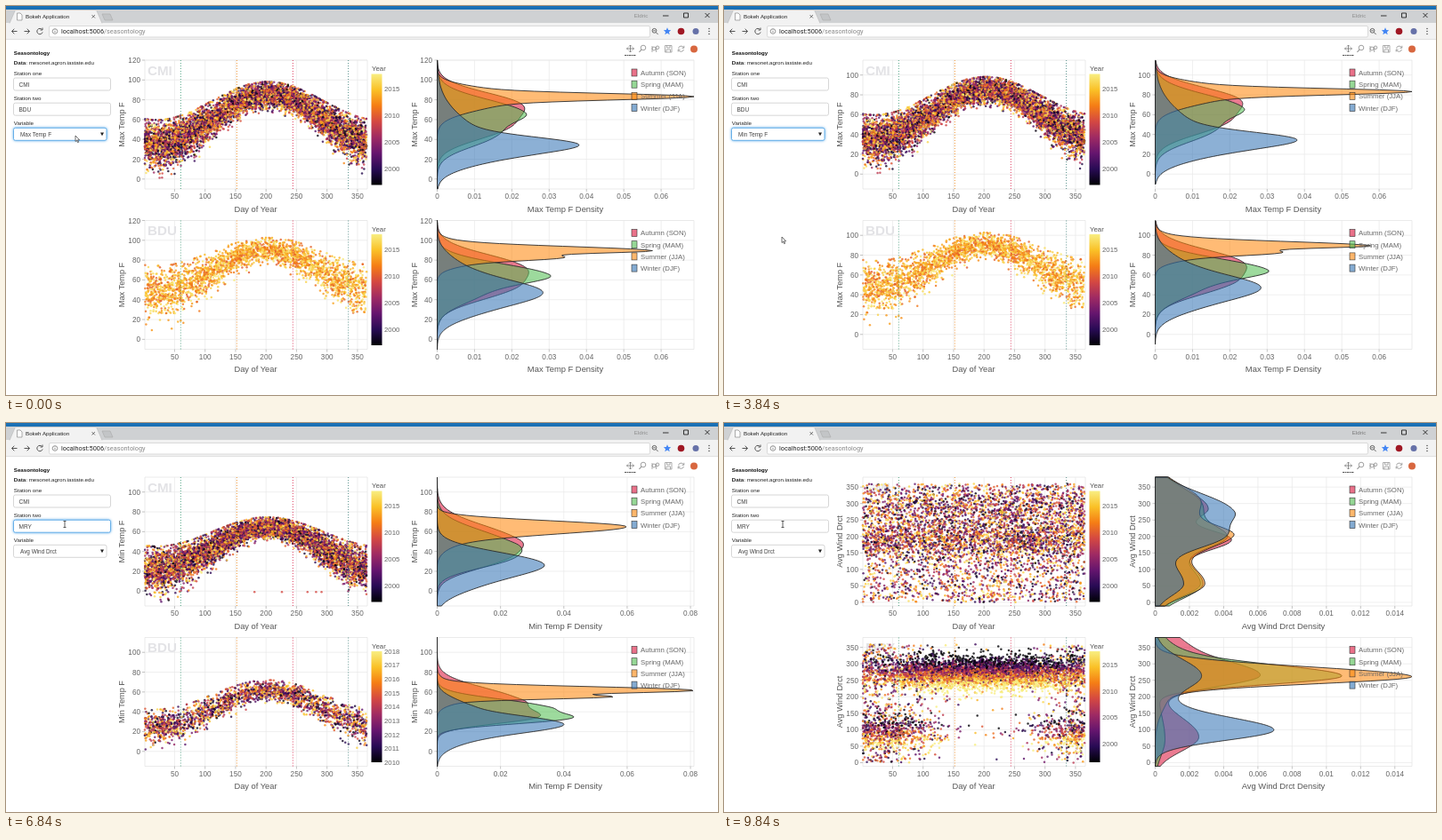
These frames come from a looping animation (800x438 px, 9.88 s). An HTML page with a canvas:

```html
<!DOCTYPE html>
<html lang="en">
<head>
<meta charset="utf-8">
<title>Seasontology</title>
<style>
html, body { margin: 0; width: 800px; height: 438px; overflow: hidden; background: #fff; }
svg, canvas { position: absolute; left: 0; top: 0; }
text { font-family: "Liberation Sans", Arial, sans-serif; white-space: pre; }
</style>
</head>
<body>
<svg id="back" width="800" height="438"></svg>
<canvas id="dots" width="800" height="438"></canvas>
<svg id="front" width="800" height="438">
  <defs>
    <linearGradient id="ramp" x1="0" y1="1" x2="0" y2="0"></linearGradient>
    <clipPath id="edge"><rect x="440" y="50" width="337" height="380"/></clipPath>
  </defs>
  <g id="chrome"></g>
  <g id="plots"></g>
  <g id="form"></g>
  <g id="pointer"></g>
</svg>
<script>
const LOOP = 9880, H = 145, TOPS = [61, 241.5], SX = 156, SW = 250, DX = 484.5, DW = 288.5;
const $ = id => document.getElementById(id);
const clamp = (v, a, b) => Math.min(b, Math.max(a, v));

const text = (x, y, s, size, fill = '#666', more = '') =>
  `<text x="${x}" y="${y}" font-size="${size}" fill="${fill}" ${more}>${s}</text>`;
const rect = (x, y, w, h, fill, more = '') =>
  `<rect x="${x}" y="${y}" width="${w}" height="${h}" fill="${fill}" ${more}/>`;
const path = (d, stroke, width = 1, more = 'fill="none"') =>
  `<path d="${d}" stroke="${stroke}" stroke-width="${width}" ${more}/>`;
const circle = (x, y, r, fill, more = '') => `<circle cx="${x}" cy="${y}" r="${r}" fill="${fill}" ${more}/>`;
const MID = 'text-anchor="middle"', END = 'text-anchor="end"';

// Colour scale of the years, dark to light
const RAMP = [[0, 0, 4], [40, 11, 84], [101, 21, 110], [159, 42, 99], [212, 72, 66], [245, 125, 21], [250, 193, 39], [248, 238, 130]];
function rampColor(t) {
  const p = clamp(t, 0, 0.999) * (RAMP.length - 1), i = Math.floor(p);
  return `rgb(${RAMP[i].map((c, k) => Math.round(c + (RAMP[i + 1][k] - c) * (p - i)))})`;
}
$('ramp').innerHTML = RAMP.map((c, i) => `<stop offset="${i / (RAMP.length - 1)}" stop-color="rgb(${c})"/>`).join('');

const SEASONS = [
  ['Autumn (SON)', 'rgb(220,20,60)'], ['Spring (MAM)', 'rgb(80,190,80)'],
  ['Summer (JJA)', 'rgb(255,135,10)'], ['Winter (DJF)', 'rgb(50,115,180)']
];

// Density bumps per season: centre, height, spread above, spread below
const MAX_A = [
  [[50, 88, 14, 14], [77, 66, 13, 14]],
  [[59, 92, 15, 11], [84, 62, 12, 14]],
  [[41, 195, 3.2, 3.5], [41, 94, 9, 13]],
  [[95, 97, 8, 9], [106, 66, 32, 13]]
];
const MAX_B = [
  [[53, 92, 15, 14], [78, 66, 12, 14]],
  [[61, 112, 13, 9], [80, 50, 12, 14]],
  [[34, 160, 4.5, 2.5], [38, 90, 9, 9], [42, 60, 2.5, 3]],
  [[79.5, 102, 13, 13], [100, 38, 14, 13], [55, 25, 15, 12]]
];
const MIN_A = [
  [[70, 80, 17, 12], [92, 64, 12, 13]],
  [[74, 72, 16, 11], [93, 66, 11, 11]],
  [[55.5, 208, 6.5, 8], [70, 22, 8, 10]],
  [[97, 110, 13, 12], [118, 42, 12, 13]]
];
const MIN_B = [
  [[70, 84, 14, 8], [89, 110, 9, 8]],
  [[78, 112, 9, 6], [91, 140, 6, 6.5]],
  [[59.5, 245, 4, 3.2], [67, 135, 1.8, 2.5], [64, 50, 9, 8]],
  [[96, 118, 10, 9], [108, 45, 10, 12], [75, 22, 9, 6]]
];
const WIND_A = [
  [[35, 172, 20, 13], [70, 228, 11, 12], [120, 148, 24, 14]],
  [[32, 152, 20, 20], [68, 190, 13, 13], [120, 156, 24, 16]],
  [[28, 150, 18, 24], [66, 206, 11, 15], [120, 162, 22, 14]],
  [[38, 245, 20, 15], [68, 190, 13, 13], [120, 93, 21, 13]]
];
const WIND_B = [
  [[18, 80, 17, 16], [46, 222, 14, 14], [127, 140, 40, 11]],
  [[15, 105, 14, 18], [47, 180, 13, 16], [130, 162, 34, 9]],
  [[18, 85, 18, 18], [48, 185, 15, 13], [85, 105, 17, 20], [124, 140, 16, 13]],
  [[44, 282, 15, 16], [12, 70, 14, 14], [127, 137, 30, 10]]
];
const WIND_C = [
  [[43, 115, 16, 12], [8, 28, 16, 16], [112, 49, 22, 16]],
  [[44, 195, 12, 9], [25, 30, 18, 15], [115, 11, 30, 18]],
  [[44, 284, 11, 8], [60, 16, 10, 20]],
  [[43, 52, 18, 16], [105, 128, 13, 11], [85, 20, 13, 12]]
];

function randoms(seed) {
  const next = () => {
    seed = (seed + 0x6D2B79F5) | 0;
    let t = Math.imul(seed ^ (seed >>> 15), 1 | seed);
    t = (t + Math.imul(t ^ (t >>> 7), 61 | t)) ^ t;
    return ((t ^ (t >>> 14)) >>> 0) / 4294967296;
  };
  next.normal = () => Math.sqrt(-2 * Math.log(next() + 1e-9)) * Math.cos(2 * Math.PI * next());
  return next;
}

// Each cloud is a list of [day, value, colour]
function cloud(seed, count, sample) {
  const rnd = randoms(seed), points = [];
  for (let i = 0; i < count; i++) {
    const day = 1 + 364 * rnd();
    const [value, t] = sample(rnd, Math.cos(2 * Math.PI * (day - 203) / 365));
    points.push([day, value, rampColor(t)]);
  }
  return points;
}
const temps = (mean, swing, cold, warm, first = 0) => (rnd, c) =>
  [mean + swing * c + clamp(rnd.normal(), -3, 2.1) * (cold + (warm - cold) * (c + 1) / 2), first + (1 - first) * rnd()];
const winds = (...groups) => rnd => {
  let pick = rnd(), v = 360 * rnd();
  for (const [share, centre, spread] of groups) {
    if (pick >= 0 && pick < share) v = centre + spread * rnd.normal();
    pick -= share;
  }
  return [(v + 360) % 360, rnd()];
};
const coastWind = (rnd, c) => {
  const off = rnd() < 0.02 + 0.75 * ((1 - c) / 2) ** 2, east = off && rnd() < 0.45;
  const centre = east ? 92 : 272;
  const v = off && !east ? 360 * rnd() : centre + 25 * rnd.normal();
  return [clamp(v, 0, 360), off && !east ? rnd() : 0.52 - (v - centre) / 75 + 0.22 * rnd.normal()];
};

const TEMP_HIGH = [-10, 120], TEMP_LOW = [-15, 115], COMPASS = [-11, 380];
const dataset = (curves, range, xmax, points, first, last) => ({ curves, range, xmax, points, first, last });
const maxA = dataset(MAX_A, TEMP_HIGH, .0688, cloud(1, 7000, temps(60.5, 25, 11.5, 6)), 1997, 2017.8);
const maxB = dataset(MAX_B, TEMP_HIGH, .0688, cloud(2, 2500, temps(68.5, 21.5, 13, 6, .62)), 1997, 2017.8);
const minA = dataset(MIN_A, TEMP_LOW, .0811, cloud(3, 6500, temps(43, 21, 11, 5)), 1997, 2017.8);
const minB = dataset(MIN_B, TEMP_LOW, .0811, cloud(4, 2200, temps(43, 18.5, 8.5, 5)), 2010, 2018);
const windA = dataset(WIND_A, COMPASS, .00515, cloud(5, 5000, winds([.28, 190, 27], [.2, 285, 38])), 1997, 2017.8);
const windB = dataset(WIND_B, COMPASS, .00515, cloud(6, 2000, winds([.38, 265, 26], [.06, 40, 25])), 2010, 2018);
const windC = dataset(WIND_C, COMPASS, .015, cloud(7, 6000, coastWind), 1996.4, 2017.6);
[181, 226, 268, 282, 291].forEach(day => minA.points.push([day, -.8, '#d44842']));

const plain = v => String(+v.toFixed(3)), exact = v => v.toFixed(3) + 'e-3';
const stage = (from, range, xmax, step, label, sets, names) => ({ from, range, xmax, step, label, sets, names });
const OLD = ['CMI', 'BDU'], NEW = ['CMI', 'MRY'];
const STAGES = [
  stage(0, TEMP_HIGH, .0688, .01, 'Max Temp F', [maxA, maxB], OLD),
  stage(3760, TEMP_LOW, .0688, .01, 'Max Temp F', [maxA, maxB], OLD),
  stage(3920, TEMP_LOW, .0811, .02, 'Min Temp F', [minA, minB], OLD),
  stage(7160, COMPASS, .00515, .001, 'Avg Wind Drct', [windA, windB], OLD),
  stage(8160, COMPASS, .015, .002, 'Avg Wind Drct', [windA, windC], NEW)
];

const dayX = d => SX - .8 + d * .685;
const valueY = (v, [lo, hi], top) => top + (hi - v) / (hi - lo) * H;

function densityPath(bumps, set, st, top) {
  const [lo, hi] = set.range, scale = set.xmax / st.xmax;
  let d = '';
  for (let y = 0; y <= H; y++) {
    const w = bumps.reduce((sum, [c, a, up, down]) =>
      sum + a * Math.exp(-((y - c) ** 2) / (2 * (y < c ? up : down) ** 2)), 0);
    const py = valueY(hi - y / H * (hi - lo), st.range, top);
    if (py < top || py > top + H) continue;
    d += `${d ? 'L' : `M${DX} ${py.toFixed(1)}L`}${(DX + Math.min(w * scale, DW)).toFixed(1)} ${py.toFixed(1)}`;
    if (y === H || py + 1 > top + H) d += `L${DX} ${py.toFixed(1)}`;
  }
  return d + 'Z';
}

function drawPlots(st) {
  const ctx = $('dots').getContext('2d');
  const yStep = st.range === COMPASS ? 50 : 20, yLast = st.range[1];
  let back = rect(0, 0, 800, 438, '#fff'), front = '';
  ctx.clearRect(0, 0, 800, 438);

  st.sets.forEach((set, k) => {
    const top = TOPS[k], bottom = top + H;
    const line = (d, color = '#e9e9e9') => path(d, color, .7);

    back += line(`M${SX} ${top}h${SW}v${H}h${-SW}z`, '#e2e2e2') + line(`M${DX} ${top}h${DW}v${H}h${-DW}z`, '#e2e2e2');
    for (let v = 0; v <= yLast; v += yStep) {
      const y = valueY(v, st.range, top);
      back += line(`M${SX} ${y}h${SW}M${DX} ${y}h${DW}`) + line(`M${SX - 3} ${y}h3M${DX - 3} ${y}h3`, '#aaa');
      front += text(151, y + 3, v, 8.2, '#666', END) + text(479, y + 3, v, 8.2, '#666', END);
    }
    for (let d = 50; d <= 350; d += 50) {
      back += line(`M${dayX(d)} ${top}v${H}`) + line(`M${dayX(d)} ${bottom}v3`, '#aaa');
      front += text(dayX(d), bottom + 11.2, d, 8.2, '#666', MID);
    }
    let ticks = '';
    for (let i = 0; i * st.step <= st.xmax; i++) {
      const x = DX + i * st.step / st.xmax * DW;
      const label = st.step === .001 ? (i ? exact(i) : '0.000e+0') : plain(i * st.step);
      back += line(`M${x} ${top}v${H}`) + line(`M${x} ${bottom}v3`, '#aaa');
      ticks += text(x, bottom + 11.2, label, 8.2, '#666', MID);
    }
    front += `<g clip-path="url(#edge)">${ticks}</g>`;
    back += text(159, top + 16.5, st.names[k], 15.2, '#e3e3e6', 'font-weight="bold"');

    for (const [day, value, color] of set.points) {
      const y = valueY(value, st.range, top);
      if (y < top || y > bottom) continue;
      ctx.globalAlpha = .8;
      ctx.fillStyle = color;
      ctx.beginPath();
      ctx.arc(dayX(day), y, 1.25, 0, 7);
      ctx.fill();
    }

    [[60, '#3f9a78'], [152, '#f08a1d'], [244, '#dc2850'], [335, '#3f7f7a']].forEach(([d, color]) =>
      front += path(`M${dayX(d)} ${top}v${H}`, color, .9, 'stroke-dasharray="1 2"'));

    front += text(280.5, bottom + 25.5, 'Day of Year', 9.3, '#555', MID)
      + text(628.5, bottom + 25.5, st.label + ' Density', 9.4, '#555', MID);
    [133, 462].forEach(x => front += text(0, 0, st.label, 9.2, '#555',
      `${MID} transform="translate(${x} ${top + 72.5}) rotate(-90)"`));

    // Year colour bar
    const barTop = top + 15.5, barH = 125, perYear = barH / (set.last - set.first);
    front += rect(410.5, barTop, 12, barH, 'url(#ramp)') + text(411, top + 12.3, 'Year', 7.8, '#555');
    for (let y = set.first === 2010 ? 2010 : 2000; y <= set.last; y += set.first === 2010 ? 1 : 5)
      front += text(425, barTop + (set.last - y) * perYear + 2.8, y, 7.8);

    SEASONS.forEach(([, color], i) =>
      front += path(densityPath(set.curves[i], set, st, top), '#2b2b2b', .9,
        `fill="${color}" fill-opacity=".56" stroke-linejoin="round"`));
    SEASONS.forEach(([name, color], i) => {
      const y = top + 14 + i * 13.2;
      front += rect(703, y - 4, 6, 8, color, 'fill-opacity=".6" stroke="#333" stroke-width=".6"')
        + text(713, y + 2.9, name, 7.8);
    });
  });
  $('back').innerHTML = back;
  $('plots').innerHTML = front;
}

function drawChrome() {
  const ink = '#555', roboto = 'style="font-family:Roboto,sans-serif"';
  $('chrome').innerHTML =
    rect(0, 0, 800, 4, '#1a70b5') + rect(0, 4, 800, 15, '#cfd1d3') + rect(0, 19, 800, 19, '#f2f2f2')
    + path('M4 19.5L10 5.5Q10.5 4.5 12 4.5H100Q101.500 4.5 102 5.5L108 19.5', '#b5b5b5', .6, 'fill="#f2f2f2"')
    + path('M12.500 8h3.500l2 2v6h-5.500z', '#888', .7, 'fill="#fff"')
    + text(22, 14.3, 'Bokeh Application', 6.2, '#222')
    + path('M96.500 10l3.500 3.500m0-3.500l-3.500 3.500', ink, .8)
    + path('M108 9h9l3 7h-9z', '#aaa', .6, 'fill="#c3c5c7"')
    + path('M738 11h6.500M761.500 8h5v5h-5zM785.500 8l5 5m0-5l-5 5', '#222', .9)
    + path('M12.500 28.500h-6m2.800-2.800l-2.800 2.800l2.800 2.800M20.500 28.500h6m-2.800-2.800l2.800 2.800l-2.800 2.800', ink, 1)
    + path('M40.500 26.500a3.200 3.200 0 1 0 .6 3M41 24.500v2.500h-2.500', ink, 1)
    + rect(48.5, 22.5, 675, 12.5, '#fff', 'rx="1.500" stroke="#ccc" stroke-width=".7"')
    + circle(55, 28.5, 2.8, 'none', 'stroke="#666" stroke-width=".7"') + path('M55 28v2M55 26.600v.7', '#666', .7)
    + text(62, 31.2, 'localhost:5006<tspan fill="#888">/seasontology</tspan>', 7.3, '#222', roboto)
    + circle(728.5, 27.8, 2.4, 'none', 'stroke="#555" stroke-width=".9"') + path('M730.300 29.700l2.400 2.400M727.300 27.800h2.400', ink, .9)
    + path('M743 24.200l1.200 2.800 3 .2-2.300 2 .8 3-2.700-1.700-2.700 1.700 .8-3-2.300-2 3-.2z', 'none', 0, 'fill="#4285f4"')
    + circle(758.5, 28.5, 3.8, '#a01824') + circle(775, 28.5, 3.5, '#6671a8')
    + [25.5, 28.5, 31.5].map(y => circle(790, y, .8, ink)).join('')
    + rect(0, 37.5, 800, .6, '#d2d2d2')
    // Plot tools
    + path('M697.500 48h8M701.500 44v8M700 45.500l1.500-1.500 1.500 1.500M700 50.500l1.500 1.500 1.500-1.500M699 46.500l-1.500 1.500 1.500 1.500M704 46.500l1.500 1.500-1.500 1.500', '#777', .8)
    + path('M695 55.500h13', '#555', 1, 'stroke-dasharray="2 .5"')
    + circle(716, 47, 2.8, 'none', 'stroke="#888" stroke-width=".8"') + path('M714 49l-2.500 3', '#888', 1.1)
    + circle(728, 48, 2, 'none', 'stroke="#999" stroke-width=".9"') + circle(732, 46.8, 1.8, 'none', 'stroke="#999" stroke-width=".9"') + path('M726 45v7M730.500 46v6', '#999', .8)
    + path('M740.500 44.500h7.500v7.500h-7.500zM742.500 44.500v2.500h3.500v-2.500M742 52v-3h4.500v3', '#999', .8)
    + path('M755.500 47.500a3.200 3.200 0 0 1 6-.5M761.500 49a3.200 3.200 0 0 1-6 .5M761.800 44.800v2.500h-2.300M755.200 51.500v-2.500h2.300', '#999', .9)
    + circle(773, 48.5, 4, '#d8673f');
}

function drawForm(s) {
  const ring = 'stroke="#66afe9" stroke-width="1" style="filter:drop-shadow(0 0 1.500px #66afe9)"';
  const box = (y, w, on) => rect(8.5, y, w, 14, '#fff', `rx="2" ${on ? ring : 'stroke="#ccc" stroke-width=".8"'}`);
  const label = (y, t) => text(8.8, y, t, 6.2, '#222');
  $('form').innerHTML =
    text(8.8, 54.5, 'Seasontology', 6.15, '#111', 'font-weight="bold"')
    + label(66.2, '<tspan font-weight="bold">Data</tspan>: mesonet.agron.iastate.edu')
    + label(78, 'Station one') + box(81, 109, false) + text(14.5, 90.6, 'CMI', 6.5, '#444')
    + label(106, 'Station two') + box(109.2, 109, s.focus === 'station')
    + (s.selected ? rect(14, 112, 14.5, 8.5, '#3b87d8') : '')
    + text(14.5, 118.8, s.station, 6.5, s.selected ? '#fff' : '#444')
    + (s.caret ? rect(15 + s.station.length * 4.8, 112.5, .7, 7.5, '#222') : '')
    + label(134, 'Variable') + box(137.3, 104.5, s.focus === 'select')
    + text(16, 146.6, s.variable, 6.4, '#444') + path('M106 142.500h4l-2 3.800z', 'none', 0, 'fill="#222"')
    + text(713.5, 12.6, 'Eldric', 6.2, s.away ? '#777' : '#8c8c8c', MID);
}

const TRACK = [
  [0, 78, 146], [500, 78, 146], [1000, 76, 142], [2600, 76, 142], [3300, 65, 260], [4000, 65, 260],
  [4280, 76, 145], [4600, 76, 145], [4800, 73, 107], [5080, 64, 114], [5250, 30, 114],
  [5500, 6, 115], [5640, 6, 115], [5900, 66, 114], [LOOP, 66, 114]
];
function pointerAt(t) {
  const i = TRACK.findIndex(k => k[0] > t), [t0, x0, y0] = TRACK[i - 1], [t1, x1, y1] = TRACK[i];
  const p = (t - t0) / (t1 - t0), e = p * p * (3 - 2 * p);
  return [x0 + (x1 - x0) * e, y0 + (y1 - y0) * e];
}

function formAt(t) {
  const typed = t < 6400 ? 'BDU' : 'MRY'.slice(0, t < 6600 ? 1 : t < 6800 ? 2 : 3);
  const focus = t < 600 || (t >= 2520 && t < 4280) ? 'select' : t >= 5120 && t < 9440 ? 'station' : '';
  return {
    focus, station: typed,
    selected: t >= 5480 && t < 6400,
    caret: t >= 6400 && t < 9440 && t % 1000 < 500,
    variable: t < 1560 ? 'Max Temp F' : t < 4520 ? 'Min Temp F' : 'Avg Wind Drct',
    away: t >= 9440
  };
}

let shownStage, shownForm;
function render(t) {
  const st = STAGES.filter(s => s.from <= t).pop();
  if (st !== shownStage) drawPlots(shownStage = st);
  const form = formAt(t), key = JSON.stringify(form);
  if (key !== shownForm) { drawForm(form); shownForm = key; }
  const [x, y] = pointerAt(t);
  const beam = t >= 5000;
  $('pointer').setAttribute('transform', `translate(${x.toFixed(1)} ${y.toFixed(1)})`);
  $('pointer').innerHTML = beam
    ? path('M-1.500-3.500h3M0-3.500v7M-1.500 3.500h3', '#333', .8)
    : path('M0 0v6.500l1.500-1.300 1.100 2.500 1-.4-1.100-2.500h2.100z', '#333', .7, 'fill="#fff"');
}

drawChrome();
const start = performance.now();
function tick() {
  render((performance.now() - start) % LOOP);
  requestAnimationFrame(tick);
}
tick();
</script>
</body>
</html>
```
